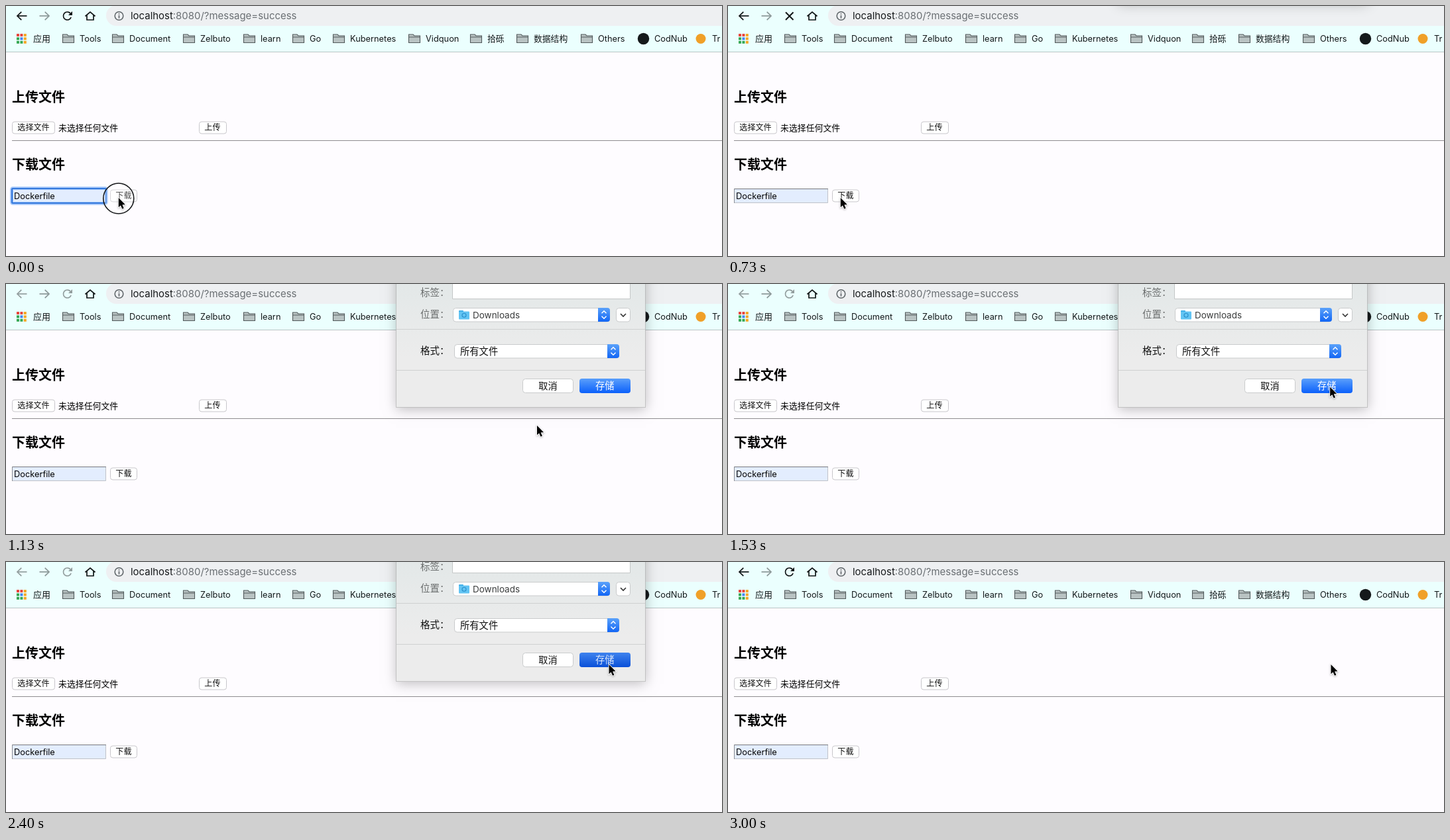
Recreate the animation shown at these times as an HTML page with a canvas. Size 1080 by 378 pixels, loop 3070 ms.

```html
<!DOCTYPE html>
<html lang="zh-CN">
<head>
<meta charset="utf-8">
<title>上传与下载</title>
<style>
html, body { margin: 0; width: 100%; height: 100%; overflow: hidden; background: #fefcff; }
canvas { display: block; }
</style>
</head>
<body>
<canvas id="stage" width="1080" height="378"></canvas>
<script>
const ctx = document.getElementById('stage').getContext('2d');
const LOOP = 3070, STEP = 1000 / 15, LAST_STEP = 45;
const FONT = 'Inter, "Noto Sans CJK SC", "Noto Sans CJK", sans-serif';

// Key moments in ms
const RING_OFF = 130, RELEASE = 200, LOADING = 330;
const SHEET_IN = 700, SHEET_OUT = 2375, SLIDE = 235, HIDDEN = -200;
const INACTIVE = 800, ACTIVE = 2670;
const PRESS_SAVE = 2130, RELEASE_SAVE = 2270;

const clamp = v => Math.max(0, Math.min(1, v));
const ease = u => (1 - Math.cos(Math.PI * clamp(u))) / 2;
const mix = (a, b, p) => a + (b - a) * p;

function text(str, x, y, size = 12.8, color = '#14181a', weight = 400) {
  ctx.font = `${weight} ${size}px ${FONT}`;
  ctx.fillStyle = color;
  ctx.fillText(str, x, y);
  return x + ctx.measureText(str).width;
}

function rect(x, y, w, h, color) {
  ctx.fillStyle = color;
  ctx.fillRect(x, y, w, h);
}

function box(x, y, w, h, r, fill, stroke, width = 1) {
  ctx.beginPath();
  ctx.roundRect(x, y, w, h, r);
  if (fill) { ctx.fillStyle = fill; ctx.fill(); }
  if (stroke) { ctx.strokeStyle = stroke; ctx.lineWidth = width; ctx.stroke(); }
}

function line(points, color, width) {
  ctx.beginPath();
  points.forEach(([x, y]) => ctx.lineTo(x, y));
  ctx.strokeStyle = color;
  ctx.lineWidth = width;
  ctx.stroke();
}

function disc(x, y, r, fill, stroke, width) {
  box(x - r, y - r, 2 * r, 2 * r, r, fill, stroke, width);
}

function vertical(y0, y1, top, bottom) {
  const g = ctx.createLinearGradient(0, y0, 0, y1);
  g.addColorStop(0, top);
  g.addColorStop(1, bottom);
  return g;
}

function arrow(x, dir, color) {
  const tip = x - dir * 7;
  line([[tip, 15], [x + dir * 7.5, 15]], color, 1.7);
  line([[tip + dir * 6.3, 8.8], [tip, 15], [tip + dir * 6.3, 21.2]], color, 1.7);
}

function reload(color) {
  ctx.beginPath();
  ctx.arc(92.5, 15, 6, 0.35, Math.PI * 1.78);
  ctx.strokeStyle = color;
  ctx.lineWidth = 1.7;
  ctx.stroke();
  ctx.beginPath();
  [[100, 8], [100, 14], [94, 14]].forEach(p => ctx.lineTo(...p));
  ctx.fillStyle = color;
  ctx.fill();
}

function toolbar(t) {
  const inactive = t >= INACTIVE && t < ACTIVE;
  const ink = inactive ? '#929d9d' : '#101415';
  rect(0, 0, 1080, 69, '#ebfffe');
  rect(0, 69, 1080, 1, '#b9c4c5');
  box(151, -1, 960, 31, 15.5, '#eef0f2');

  arrow(24, 1, ink);
  arrow(58, -1, '#8b9797');
  if (t >= LOADING && t < INACTIVE) {
    line([[87, 9.5], [98.5, 21]], ink, 1.9);
    line([[98.5, 9.5], [87, 21]], ink, 1.9);
  } else {
    reload(ink);
  }
  line([[119.5, 15.5], [127, 9], [134.5, 15.5]], '#101415', 1.7);
  line([[122, 14], [122, 21], [132, 21], [132, 14]], '#101415', 1.7);

  disc(170.5, 15, 6.3, null, '#5c6266', 1.5);
  rect(169.7, 14, 1.6, 4.6, '#5c6266');
  rect(169.7, 11.2, 1.6, 1.6, '#5c6266');
  const end = text('localhost', 188, 20.3, 14.95, '#16191b');
  text(':8080/?message=success', end, 20.3, 14.95, '#6a6f73');
  bookmarks();
}

function folder(x) {
  ctx.beginPath();
  [[0, 43], [6.5, 43], [8.5, 45], [17, 45], [17, 55.5], [0, 55.5]]
    .forEach(([dx, y]) => ctx.lineTo(x + 0.5 + dx, y));
  ctx.closePath();
  ctx.fillStyle = '#b9c3c3';
  ctx.fill();
  ctx.strokeStyle = '#535b5c';
  ctx.lineWidth = 1.1;
  ctx.stroke();
  line([[x + 0.5, 47], [x + 17.5, 47]], '#535b5c', 1);
}

function bookmarks() {
  const red = '#e8453c', amber = '#f5a623', green = '#34a853', blue = '#4285f4';
  [red, red, amber, green, blue, amber, green, green, amber].forEach((color, i) =>
    rect(16 + i % 3 * 5.4, 42 + Math.floor(i / 3) * 5.4, 4, 4, color));
  text('应用', 41, 53.8, 13);
  const items = { Tools: 85, Document: 160, Zelbuto: 267, learn: 358, Go: 432, Kubernetes: 493,
    Vidquon: 607, '拾砾': 700, '数据结构': 770, Others: 867 };
  for (const [name, x] of Object.entries(items)) {
    folder(x);
    text(name, x + 26, 53.8);
  }
  disc(961.5, 49.5, 8.7, '#15191b');
  text('CodNub', 978, 53.8);
  disc(1048, 49.5, 7.5, '#f0a028');
  text('Tr', 1065, 53.8);
}

function pageButton(label, x, y, w) {
  box(x + 0.5, y + 1, w - 1, 18, 3.5, '#fff', '#c8c7cb');
  text(label, x + 8.3, y + 14, 12.1, '#111');
}

function page(t) {
  rect(0, 70, 1080, 308, '#fefcff');
  text('上传文件', 9, 144.5, 20, '#000', 700);
  pageButton('选择文件', 9, 174, 65);
  text('未选择任何文件', 79, 188.6, 12.9, '#000');
  pageButton('上传', 291, 174, 42);
  rect(9, 203, 1071, 1, '#8f8d90');
  text('下载文件', 9, 246.5, 20, '#000', 700);

  rect(9, 276, 142, 22, '#e3edfe');
  if (t < RING_OFF) {
    box(8.5, 275.5, 143, 23, 2, null, 'rgba(75,145,245,.45)', 5);
    box(9, 276, 142, 22, 1, null, '#3478dc', 2.2);
  } else {
    box(9.5, 276.5, 141, 21, 0, null, '#bfc2c8');
    rect(9, 276, 142, 1, '#77797e');
    rect(9, 276, 1, 22, '#8b8e94');
  }
  text('Dockerfile', 12, 291.6, 12.8, '#000');
  pageButton('下载', 157, 277, 41);
}

function chevrons(x, y) {
  box(x, y, 18, 21, [0, 4, 4, 0], vertical(y, y + 21, '#5ba2fa', '#1266f5'));
  line([[x + 5.5, y + 8.3], [x + 9, y + 4.8], [x + 12.5, y + 8.3]], '#fff', 1.5);
  line([[x + 5.5, y + 12.7], [x + 9, y + 16.2], [x + 12.5, y + 12.7]], '#fff', 1.5);
}

function popup(x, y, w) {
  box(x + 0.5, y + 0.5, w - 1, 20.5, 4, '#fff', '#c9cbcc');
  chevrons(x + w - 18, y);
}

function sheet(t) {
  if (t < SHEET_IN || t > SHEET_OUT + SLIDE) return;
  const dy = HIDDEN * (1 - ease((t - SHEET_IN) / SLIDE) + ease((t - SHEET_OUT) / SLIDE));

  ctx.save();
  ctx.shadowColor = 'rgba(0,0,0,.25)';
  ctx.shadowBlur = 18;
  ctx.shadowOffsetY = 3;
  rect(588.5, dy - 60, 376, 246.5, '#ececec');
  ctx.restore();
  rect(588.5, dy - 60, 376, 246.5, vertical(0, 110, '#e3e8e8', '#ececec'));

  ctx.save();
  ctx.translate(0, Math.round(dy));
  box(588.5, -60, 376, 246.5, 0, null, 'rgba(0,0,0,.17)');
  rect(589, 68, 375, 1, '#cfd1d1');
  rect(589, 130, 375, 1, '#cfd1d1');

  text('标签：', 625, 17.5, 14.5, '#6a6d6d');
  box(673.5, -4, 268, 26.5, 0, '#fff', '#c4c7c7');
  text('位置：', 625, 51, 14.5, '#6a6d6d');
  popup(674, 36, 237);
  box(683, 40, 7, 4, 1, '#35a9e4');
  box(683, 41.5, 16, 12, 1, '#62c4f3');
  disc(691, 47.3, 3, null, '#2b8fca', 1.1);
  text('Downloads', 704, 51.5, 13.5, '#3a3c3c');
  box(920.5, 36.5, 21, 20.5, 4, '#fff', '#c9cbcc');
  line([[927, 45], [931, 49], [935, 45]], '#333', 1.6);

  text('格式：', 625, 106, 14.5, '#111', 500);
  popup(676, 91, 249);
  text('所有文件', 685, 106.5, 14.3, '#111');

  box(779.5, 143.5, 76, 21, 4, '#fff', '#c9cbcc');
  text('取消', 803.3, 159.3, 14.2, '#111');
  const blue = t >= PRESS_SAVE ? ['#3f83ee', '#0a50d8'] : ['#5a9ffb', '#0b60fb'];
  box(865, 143, 77, 22, 4, vertical(143, 165, ...blue));
  text('存储', 889, 159.3, 14.3, t >= PRESS_SAVE ? '#d8e5fb' : '#fff');
  ctx.restore();
}

function pointerAt(t) {
  if (t <= 1130) {
    const p = ease((t - 800) / 330);
    return [mix(169.8, 801, p), mix(290, 214, p)];
  }
  const p = 1 - (1 - clamp((t - 1130) / 450)) ** 2;
  return [mix(801, 909.5, p), mix(214, 155, p)];
}

function pointer(t) {
  const [x, y] = pointerAt(t);
  if (t < RELEASE || (t >= PRESS_SAVE && t < RELEASE_SAVE)) {
    disc(x, y + 1, 23, 'rgba(255,255,255,.25)', '#16181a', 1.6);
  }
  ctx.save();
  ctx.translate(x, y);
  ctx.scale(0.95, 0.95);
  ctx.shadowColor = 'rgba(0,0,0,.3)';
  ctx.shadowBlur = 3;
  ctx.shadowOffsetY = 1;
  ctx.beginPath();
  [[0, 0], [0, 15], [3.3, 12], [5.8, 17.6], [8.3, 16.5], [5.9, 11.1], [10.6, 10.8]]
    .forEach(p => ctx.lineTo(...p));
  ctx.closePath();
  ctx.lineWidth = 1.8;
  ctx.strokeStyle = '#fff';
  ctx.stroke();
  ctx.shadowColor = 'transparent';
  ctx.fillStyle = '#000';
  ctx.fill();
  ctx.restore();
}

function render() {
  const now = performance.now() % LOOP;
  const step = Math.min(LAST_STEP, Math.floor((now + 5) / STEP));
  const t = Math.round(step * STEP / 10) * 10;
  page(t);
  toolbar(t);
  sheet(t);
  pointer(t);
  requestAnimationFrame(render);
}
render();
</script>
</body>
</html>
```
